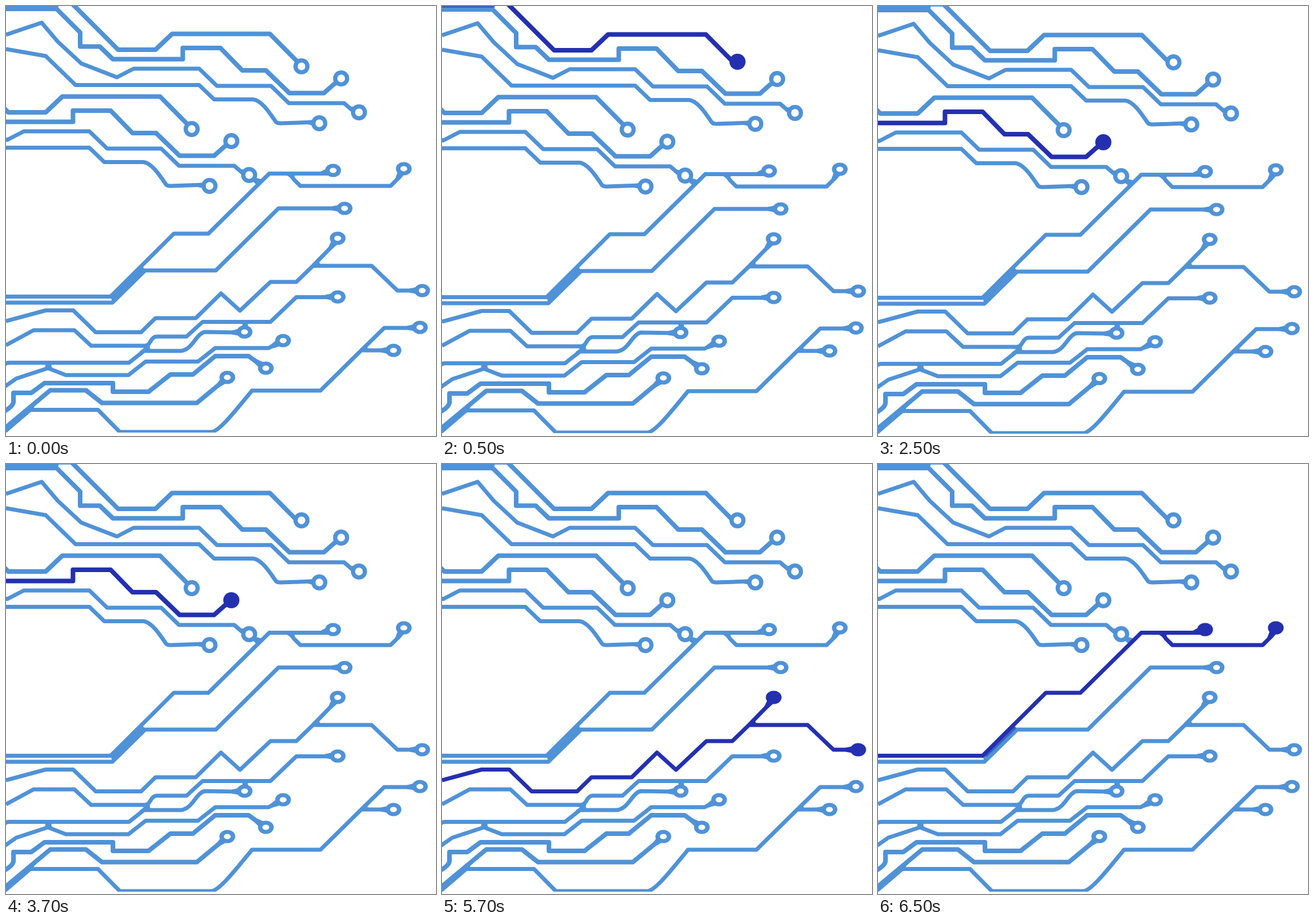
An HTML page for the animation above (8 s loop, 748 px wide and 748 px high).

```html
<!DOCTYPE html>
<html>
<head>
<meta charset="utf-8">
<style>
  html, body { margin: 0; width: 100%; height: 100%; overflow: hidden; background: #fff; }
  svg { display: block; }
  .wire { color: #5092d7; }
  .wire.on { color: #2430b0; }
  .line { fill: none; stroke: currentColor; stroke-linejoin: round; }
  .blend { opacity: .5; }
  .solid, .on .hole { fill: currentColor; }
  .hole { fill: #fff; }
</style>
</head>
<body>
<svg id="stage" width="748" height="744"><g id="art"></g></svg>
<script>
const stage = document.getElementById('stage');
const art = document.getElementById('art');

const line = (d, width, extra = '') =>
  `<path class="line ${extra}" d="${d}" stroke-width="${width}"/>`;
const solid = d => `<path class="solid" d="${d}"/>`;

// Ring at (x, y) with a flare that narrows towards (px, py)
function ring(x, y, px, py, big) {
  const len = Math.hypot(x - px, y - py);
  const nx = (py - y) / len, ny = (x - px) / len;
  const base = big ? 6 : 8;
  const [rx, ry, hx, hy] = big ? [14, 14, 6.7, 6.7] : [13.7, 11.6, 6, 4.5];
  const at = (cx, cy, k) => `${cx + nx * k} ${cy + ny * k}`;
  return solid(`M${at(px, py, 3.5)}L${at(x, y, base)}L${at(x, y, -base)}L${at(px, py, -3.5)}Z`) +
    `<ellipse class="solid" cx="${x}" cy="${y}" rx="${rx}" ry="${ry}"/>` +
    `<ellipse class="hole" cx="${x}" cy="${y}" rx="${hx}" ry="${hy}"/>`;
}

const wire = (id, ...parts) => `<g class="wire" id="${id}">${parts.join('')}</g>`;

const topPath = 'M0 -3H114L195 78H260L289 50.5H459';
const lowRing = line(topPath + 'L508 100', 8) + ring(514, 107, 505, 97, true);
const highRing = line(topPath + 'L503 95', 8) + ring(514, 98, 500, 92, true);

// Four wires that appear twice, once shifted down and left
const bundle = n => [
  wire('b' + n,
    solid('M0 0H92L88 8H0Z'),
    line('M-200 94H0M0 7H88L129 48V72.500H163L186 94.500H307.500V75H373L411 114H452L493 153.500H553L575 134', 8),
    ring(583, 128, 571, 138, true)),
  wire('a' + n, lowRing),
  wire('c' + n,
    line('M0 52L62 31L90 64L131 102L193 126L222 111H336L367 141H461L492 171H588L602 183', 7),
    ring(614, 187, 600, 180, true)),
  wire('d' + n,
    line('M0 77L69 89L121 139.500H336L362 164.500H430C445 166 460 190 469 203Q471 206 478 206L535 204', 7),
    ring(545, 206, 525, 204.5, true))
].join('');

art.innerHTML = bundle(1) + `<g transform="translate(-191 109)">${bundle(2)}</g>` +
  wire('h',
    solid('M182 507L185 518L243 462L236 453Z'),
    solid('M428 306L437 314L446 304L436 301Z'),
    line('M0 518H185L242 462H365L474 354H575', 7),
    ring(589, 354, 567, 354)) +
  wire('g',
    line('M187 508L239 458', 5, 'blend'),
    line('M0 507.500H182L292 398H352L458 293.500H560M490 293.500Q497 297 501 304L512 315H669L686 298', 7),
    solid('M487 293H506Q500 297 502 304L497 303Z'),
    ring(569, 288, 549, 293),
    ring(692, 285, 680, 304)) +
  wire('i',
    line('M0 550L69 531.500H117L156 569.500H235L260 545H330L374 502L407 532L460 482H505L534 454L570 417M534 454H636L681 497H712', 7),
    solid('M530 456L546 441Q542 449 550 454Z'),
    ring(577, 406, 564, 423),
    ring(724, 497, 702, 497)) +
  wire('j',
    line('M0 592L48 566H119L148 593H242Q248 592 251 586Q256 577 262 577H314L342 551.500H460L505 508.500H565', 7),
    solid('M407 551H425Q417 556 423 562H409Q415 556 407 551Z'),
    ring(577, 508, 555, 508)) +
  wire('k',
    line('M-3 626Q0 622.500 6 622.500H214L240 602H304C325 600 330 572 346 569L405 570', 7),
    solid('M230 594H248L257 582Q244 597 256 603H232L240 597Z'),
    ring(415, 569, 393, 570)) +
  wire('l',
    line('M-2 664L18 650L73 632L104 644H213L243 620.500H334L364 597H457L473 588', 7),
    solid('M63 623H84Q75 626 82 633H65Q73 626 63 623Z'),
    ring(482, 584, 461, 595)) +
  wire('m',
    line('M-3 707Q13 698 13 690V675H44L67 658H186V673H248L286 643H325L364 611H422L440 624', 8),
    ring(452, 632, 433, 619)) +
  wire('n',
    solid('M0 732L44 696L54 695Q46 699 50 705L40 707L0 742Z'),
    line('M-4 738L77 670.500H139L167 692.500H332L376 656', 8),
    ring(385, 648, 368, 663)) +
  wire('o',
    line('M-4 744L42 704.500H160L198 743H358C372 741 400 705 428 671H547L618 601L658 562H708M618 601H662', 7),
    solid('M613 604L632 587Q624 596 634 601Z'),
    ring(720, 561, 698, 562),
    ring(674, 601, 652, 601));

const a1 = document.getElementById('a1');
a1.insertAdjacentHTML('afterbegin', line('M0 2H92', 4, 'blend'));
const [lowA, highA] = [lowRing, highRing].map(s => line('M0 2H92', 4, 'blend') + s);

// start time, vertical shift, lit wire
const steps = [[0, -2, ''], [500, -1, 'a1'], [2500, 0, 'b2'], [4500, 0, 'i'], [6500, 0, 'g']];
let shown = -1;

function frame(now) {
  const t = now % 8000;
  const k = steps.filter(s => s[0] <= t).length - 1;
  if (k !== shown) {
    shown = k;
    const [, dy, lit] = steps[k];
    stage.setAttribute('height', 744 + dy);
    art.setAttribute('transform', `translate(0 ${dy})`);
    a1.innerHTML = k ? highA : lowA;
    document.querySelectorAll('.wire').forEach(w => w.classList.toggle('on', w.id === lit));
  }
  requestAnimationFrame(frame);
}
frame(0);
</script>
</body>
</html>
```
